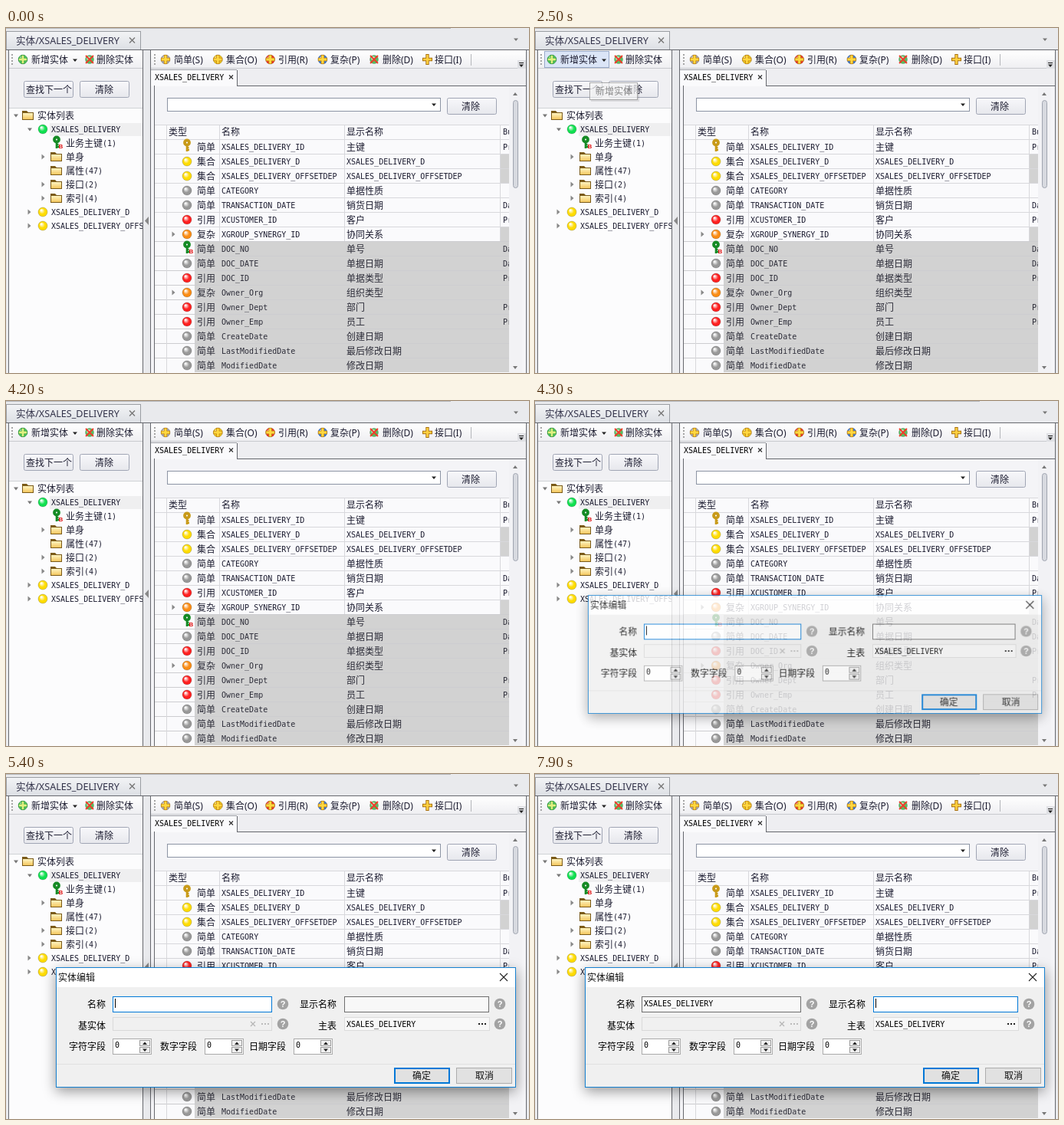
An HTML page with a canvas for the animation above (8 s loop, 682x450 px).

```html
<!DOCTYPE html>
<html lang="zh">
<head>
<meta charset="utf-8">
<style>
html, body { margin: 0; width: 682px; height: 450px; overflow: hidden; }
canvas { position: absolute; left: 0; top: 0; }
#dialog { transform-origin: 364.5px 330.5px; }
</style>
</head>
<body>
<canvas id="main" width="682" height="450"></canvas>
<canvas id="dialog" width="682" height="450"></canvas>
<script>
const LOOP = 8000;
const dialog = document.getElementById('dialog');
const mainCtx = document.getElementById('main').getContext('2d');
const dialogCtx = dialog.getContext('2d');
const HOVER = '#dbe5f7', LINE = '#d8d8dc', GRAY = '#d2d2d2', EDGE = '#66686e', INK = '#1c1c30';
const NORMAL = [110, 110, 110], DARK = [23, 23, 23], FOCUS = [0, 120, 215];
const BALL = { green: '#10e050', yellow: '#ffdc00', gray: '#989898', red: '#ff2020', orange: '#fa8c14' };
let g = mainCtx;

function box(x, y, w, h, fill, stroke, lineWidth = 1) {
  if (fill) { g.fillStyle = fill; g.fillRect(x, y, w, h); }
  if (stroke) {
    g.strokeStyle = stroke;
    g.lineWidth = lineWidth;
    g.strokeRect(x + lineWidth / 2, y + lineWidth / 2, w - lineWidth, h - lineWidth);
  }
}
function fade(y, h, from, to) {
  const f = g.createLinearGradient(0, y, 0, y + h);
  f.addColorStop(0, from);
  f.addColorStop(1, to);
  return f;
}
function roundBox(x, y, w, h, fill, stroke, r = 2) {
  g.beginPath();
  g.roundRect(x + .5, y + .5, w - 1, h - 1, r);
  g.fillStyle = fill; g.fill();
  g.strokeStyle = stroke; g.lineWidth = 1; g.stroke();
}
function button(label, x, y, textX, hovered) {
  roundBox(x, y, 65, 22, hovered ? HOVER : fade(y, 22, '#f8f8fb', '#e6e7ec'), '#a0a5b4');
  ui(label, textX, y + 11, INK);
}
function poly(fill, ...p) {
  g.beginPath();
  for (let i = 0; i < p.length; i += 2) g.lineTo(p[i], p[i + 1]);
  g.closePath();
  g.fillStyle = fill; g.fill();
}
function path(color, width, ...lines) {
  g.beginPath();
  for (const [x1, y1, x2, y2] of lines) { g.moveTo(x1, y1); g.lineTo(x2, y2); }
  g.strokeStyle = color; g.lineWidth = width; g.stroke();
}
const cross = (x, y, r, color, width = 1.2) =>
  path(color, width, [x - r, y - r, x + r, y + r], [x - r, y + r, x + r, y - r]);
const down = (x, y, color = '#222') => poly(color, x - 3, y - 1.5, x + 3, y - 1.5, x, y + 2);

// y is the middle of the line
function ui(s, x, y, color = '#111', size = 12) {
  g.font = `${size}px "Noto Sans", "Noto Sans CJK SC", sans-serif`;
  g.fillStyle = color;
  g.fillText(s, x, y + 4.5);
}
// Latin cells of 6px beside Chinese cells of 12px
function cells(s, x, y, color = '#000') {
  g.fillStyle = color;
  for (const run of s.match(/[\x00-\x7f]+|[^\x00-\x7f]+/g)) {
    const latin = run.charCodeAt(0) < 128;
    g.font = latin ? '10px "DejaVu Sans Mono", monospace' : '12px "Noto Sans CJK SC", sans-serif';
    g.fillText(run, x, y + (latin ? 4 : 4.5));
    x += run.length * (latin ? 6 : 12);
  }
}
function ball(x, y, color, r = 6) {
  const shade = g.createRadialGradient(x - 2, y - 2.5, .5, x, y, r);
  shade.addColorStop(0, '#fff');
  shade.addColorStop(.6, color);
  shade.addColorStop(1, color);
  g.beginPath();
  g.arc(x, y, r, 0, 7);
  g.fillStyle = shade; g.fill();
  g.strokeStyle = '#0004'; g.lineWidth = .7; g.stroke();
}
function plus(x, y, color, bar = '#ffd840', rim = '#c08010') {
  ball(x, y, color);
  path(rim, 4.4, [x - 6, y, x + 6, y], [x, y - 6, x, y + 6]);
  path(bar, 2.8, [x - 5.2, y, x + 5.2, y], [x, y - 5.2, x, y + 5.2]);
}
function remove(x, y) {
  ball(x, y, '#58c060', 5.5);
  cross(x, y, 5, '#f03828', 1.8);
}
function folder(x, y) {
  poly('#7a5a18', x - 8, y - 6, x - 2, y - 6, x, y - 4, x + 7, y - 4, x + 7, y + 6, x - 8, y + 6);
  box(x - 7, y - 3, 13, 8, fade(y - 3, 8, '#fff4c0', '#f4c860'));
}
function key(x, y, color, tagged) {
  g.beginPath();
  g.arc(x, y - 2.5, 3, 0, 7);
  g.strokeStyle = color; g.lineWidth = 3.8; g.stroke();
  path(color, 2.6, [x, y, x, y + 9], [x, y + 7, x + 3, y + 7], [x, y + 4, x + 2.5, y + 4]);
  if (tagged) {
    g.font = 'bold 8px "Liberation Sans", sans-serif';
    g.fillStyle = '#e01010';
    g.fillText('B', x + 2.5, y + 9);
  }
}
function branch(x, y, open) {
  if (open) poly('#777', x - 3, y - 1.5, x + 3, y - 1.5, x, y + 2.5);
  else poly('#888', x - 1.5, y - 3.5, x + 2.5, y, x - 1.5, y + 3.5);
}
function grip(x) {
  for (let y = 34; y < 49; y += 4) box(x, y, 2, 2, '#a5a5a5');
}
function clipped(x, y, w, h, draw) {
  g.save();
  g.beginPath();
  g.rect(x, y, w, h);
  g.clip();
  draw();
  g.restore();
}

function drawFrame() {
  box(0, 0, 682, 450, '#e9eaed');
  box(0, 0, 580, 1, '#b4b6ba');
  box(0, 4, 176, 25, fade(4, 25, '#f3f4f6', '#dcdfe4'), '#9a9da2');
  box(0, 28, 682, 1, EDGE);
  ui('实体/XSALES_DELIVERY', 13, 16, '#33334a', 12.6);
  cross(164.5, 16, 3.5, '#777', 1.4);
  down(665, 15, '#777');
  box(3, 28, 176, 430, '#f0f0f3', EDGE);
  box(188, 28, 491, 430, '#f4f4f7', EDGE);
  poly('#888', 186, 246, 181, 251.5, 186, 257);
}

function drawLeft(t) {
  box(4, 29, 174, 23, fade(29, 23, '#fff', '#efeff2'));
  box(4, 52, 174, 1, '#c8cace');
  grip(7);
  const menuOpen = t >= 3300 && t < 4200;
  if (menuOpen) box(12, 30, 85, 23, '#fff', '#777');
  else if (t >= 2000 && t < 3300) box(12, 30, 85, 22, HOVER, '#98a9c8');
  plus(22, 41, '#50c860', '#e0f080', '#209838');
  ui('新增实体', 33, 41, INK);
  down(90, 42);
  remove(109, 41);
  ui('删除实体', 118, 41, INK);

  button('查找下一个', 23, 69, 26, t >= 1700 && t < 2000);
  button('清除', 96, 69, 116);
  drawTree();

  const tip = steps(t, 2400, 3);
  if (tip && t < 3300) {
    g.globalAlpha = tip;
    box(73, 73, 63, 23, '#0002');
    box(71, 71, 63, 23, '#fff', '#808080');
    ui('新增实体', 79, 82, '#555');
    g.globalAlpha = 1;
  }
  if (menuOpen) drawMenu(t);
}

function drawTree() {
  box(4, 105, 174, 345, '#fcfcfd');
  box(4, 104, 174, 1, '#d0d2d5');
  box(57, 124, 121, 17, '#efeff0');
  branch(13, 114, true);
  folder(29, 114);
  cells('实体列表', 41, 114, INK);
  branch(31, 132, true);
  ball(48, 132, BALL.green);
  cells('XSALES_DELIVERY', 59, 132, INK);
  key(66, 148, '#148a24', true);
  cells('业务主键(1)', 78, 150, INK);
  ['单身', '属性(47)', '接口(2)', '索引(4)'].forEach((label, i) => {
    const y = 168 + 18 * i;
    if (i !== 1) branch(48, y);
    folder(66, y);
    cells(label, 78, y, INK);
  });
  clipped(4, 230, 174, 40, () => ['XSALES_DELIVERY_D', 'XSALES_DELIVERY_OFFSETDEP'].forEach((label, i) => {
    const y = 240 + 18 * i;
    branch(30, y);
    ball(48, y, BALL.yellow);
    cells(label, 59, y, INK);
  }));
}

function drawMenu(t) {
  box(15, 55, 157, 47, '#0003');
  box(12, 52, 158, 48, '#fff', '#808080');
  box(13, 51, 83, 2, '#fff');
  box(13, 53, 23, 46, '#f1f2f4');
  if (t >= 3700) box(14, t < 3800 ? 53 : 75, 153, 22, HOVER, '#98a9c8');
  ui('根实体', 48, 63);
  ui('集合实体(明细)', 48, 86);
}

const rows = [
  ['key', '简单', 'XSALES_DELIVERY_ID', '主键', 'Pr'],
  ['yellow', '集合', 'XSALES_DELIVERY_D', 'XSALES_DELIVERY_D'],
  ['yellow', '集合', 'XSALES_DELIVERY_OFFSETDEP', 'XSALES_DELIVERY_OFFSETDEP'],
  ['gray', '简单', 'CATEGORY', '单据性质', ' '],
  ['gray', '简单', 'TRANSACTION_DATE', '销货日期', 'Da'],
  ['red', '引用', 'XCUSTOMER_ID', '客户', 'Pr'],
  ['orange', '复杂', 'XGROUP_SYNERGY_ID', '协同关系'],
  ['tagged', '简单', 'DOC_NO', '单号', 'Da'],
  ['gray', '简单', 'DOC_DATE', '单据日期', 'Da'],
  ['red', '引用', 'DOC_ID', '单据类型', 'Pr'],
  ['orange', '复杂', 'Owner_Org', '组织类型'],
  ['red', '引用', 'Owner_Dept', '部门', 'Pr'],
  ['red', '引用', 'Owner_Emp', '员工', 'Pr'],
  ['gray', '简单', 'CreateDate', '创建日期', ' '],
  ['gray', '简单', 'LastModifiedDate', '最后修改日期', ' '],
  ['gray', '简单', 'ModifiedDate', '修改日期', ' '],
];

function drawTable() {
  box(194, 126, 462, 324, '#fafafc');
  rows.forEach(([icon, kind, name, label, extra], i) => {
    const y = 155 + 19 * i, locked = i > 6;
    if (locked) box(246, y - 10, 410, 19, GRAY);
    else if (!extra) box(645, y - 9, 11, 18, GRAY);
    box(194, y - 10, 462, 1, locked ? '#cdcdd0' : LINE);
    if (icon === 'key') key(236, y - 3, '#c89a18');
    else if (icon === 'tagged') key(236, y - 3, '#148a24', true);
    else ball(236, y, BALL[icon]);
    if (kind === '复杂') branch(218, y);
    const color = locked ? '#2c2c38' : INK;
    cells(kind, 249, y, color);
    cells(name, 281, y, color);
    cells(label, 444, y, color);
    if (extra) clipped(645, y - 9, 11, 18, () => cells(extra, 648, y, color));
  });
  box(194, 126, 462, 1, LINE);
  box(209, 126, 1, 324, LINE);
  for (const x of [278, 441, 644]) box(x, 126, 1, 152, LINE);
  cells('类型', 212, 135, INK);
  cells('名称', 281, 135, INK);
  cells('显示名称', 444, 135, INK);
  clipped(645, 127, 11, 18, () => cells('Bu', 648, 135, INK));
}

function drawRight(t) {
  box(189, 29, 489, 23, fade(29, 23, '#fff', '#efeff2'));
  box(189, 52, 489, 1, '#c8cace');
  grip(193);
  if (t >= 600 && t < 700) box(539, 30, 64, 22, HOVER, '#98a9c8');
  ['#a8a8b0', '#f0c820', '#f03828', '#3878d8'].forEach((color, i) => plus(208 + 68.3 * i, 41, color));
  remove(480, 41);
  path('#a87010', 4.4, [543, 41, 556, 41], [549.5, 34, 549.5, 48]);
  path('#ffd040', 2.6, [544, 41, 555, 41], [549.5, 35, 549.5, 47]);
  ['简单(S)', '集合(O)', '引用(R)', '复杂(P)', '删除(D)', '接口(I)'].forEach((s, i) => ui(s, 219 + 68 * i, 41, INK));
  box(606, 34, 1, 15, '#b4b6ba');
  box(667, 42, 11, 11, '#dfe0e4');
  box(669, 45, 6, 1, '#222');
  down(672, 49);

  box(189, 53, 489, 22, '#eeeef1');
  box(301, 75, 377, 1, EDGE);
  box(189, 55, 112, 21, '#fafafc');
  box(189, 54, 112, 1, '#a0a3a8');
  box(301, 55, 1, 21, EDGE);
  cells('XSALES_DELIVERY', 194, 64);
  cross(293.5, 64, 2.5, '#333');

  box(193, 75, 1, 375, EDGE);
  box(210, 91, 357, 18, '#fff', '#8c94a4');
  down(558, 100);
  button('清除', 575, 91, 594);
  drawTable();

  box(656, 76, 17, 374, '#f2f2f5');
  poly('#777', 661, 88, 667, 88, 664, 84);
  poly('#777', 661, 441, 667, 441, 664, 445);
  roundBox(661, 94, 7, 115, '#d8dae0', '#a0a5b0', 3);
}

function steps(t, start, count) {
  return Math.max(0, Math.min(count, Math.floor((t - start) / 100) + 1)) / count;
}
const mix = (a, b, k) => `rgb(${a.map((v, i) => Math.round(v + (b[i] - v) * k))})`;

function help(x, y) {
  g.beginPath();
  g.arc(x, y, 7.3, 0, 7);
  g.fillStyle = '#a3a3a3'; g.fill();
  g.font = 'bold 11px "Liberation Sans", sans-serif';
  g.fillStyle = '#fff';
  g.fillText('?', x - 3.3, y + 4);
}
function dots(x, y, color) {
  for (let i = 0; i < 3; i++) box(x + 4 * i, y, 2, 2, color);
}
function spinner(label, labelX, x) {
  cells(label, labelX, 355);
  box(x, 345, 51, 21, '#fff', '#aaa');
  cells('0', x + 3, 353);
  for (const y of [347, 356]) box(x + 35, y, 14, 8, '#f0f0f0', '#999');
  poly('#222', x + 39, 353, x + 45, 353, x + 42, 349.5);
  poly('#222', x + 39, 358.5, x + 45, 358.5, x + 42, 362);
}

function drawDialog(t) {
  g.clearRect(0, 0, 682, 450);
  g.shadowColor = '#0006';
  g.shadowBlur = 16;
  g.shadowOffsetY = 5;
  box(65, 252, 600, 157, '#f0f0f0');
  g.shadowColor = 'transparent';
  box(65, 252, 600, 26, '#fff');
  box(65, 252, 600, 157, null, '#1580d0');
  ui('实体编辑', 68, 265);
  cross(649, 265, 5, '#222', 1.1);

  const moved = steps(t, 7700, 3), pasted = t >= 6300;
  const displayBorder = moved ? mix(DARK, FOCUS, moved) : mix(NORMAL, DARK, steps(t, 6800, 2));
  cells('名称', 106, 300);
  box(139, 290, 208, 21, moved ? '#f8f8f8' : '#fff', mix(FOCUS, NORMAL, moved));
  if (pasted) cells('XSALES_DELIVERY', 142, 299);
  cells('显示名称', 383, 300);
  box(441, 290, 189, 21, moved ? '#fff' : '#f8f8f8', displayBorder);

  const caretOn = t < 4700 || (t >= 5400 && t < 5900) || (t >= 6300 && t < 7200) || t >= 7700;
  if (caretOn) box(moved ? 444 : pasted ? 232 : 142, 293, 1, 12, '#000');

  cells('基实体', 94, 328);
  box(139, 317, 208, 18, '#f0f0f0', '#d9d9d9');
  cross(322, 326, 3, '#b5b5b5');
  dots(333, 325, '#bbb');
  cells('主表', 407, 328);
  box(441, 317, 190, 18, '#f8f8f8', '#dcdcdc');
  cells('XSALES_DELIVERY', 444, 326);
  dots(616, 325, '#222');
  for (const x of [361, 644]) for (const y of [300, 326]) help(x, y);

  spinner('字符字段', 82, 139);
  spinner('数字字段', 201, 259);
  spinner('日期字段', 317, 375);
  box(66, 378, 598, 1, '#e0e0e0');
  box(506, 383, 73, 21, '#e1e1e1', '#0078d7', 2);
  box(587, 383, 73, 21, '#e1e1e1', '#adadad');
  ui('确定', 530, 393);
  ui('取消', 612, 393);
}

function draw(now) {
  const t = now % LOOP;
  g = mainCtx;
  drawFrame();
  drawLeft(t);
  drawRight(t);

  const phase = Math.floor((t - 4300) / 100);
  dialog.style.opacity = phase < 0 ? 0 : [.8, .95][phase] ?? 1;
  dialog.style.transform = `scale(${[.987, .996][phase] ?? 1})`;
  if (phase >= 0) {
    g = dialogCtx;
    drawDialog(t);
  }
  requestAnimationFrame(draw);
}
requestAnimationFrame(draw);
</script>
</body>
</html>
```
